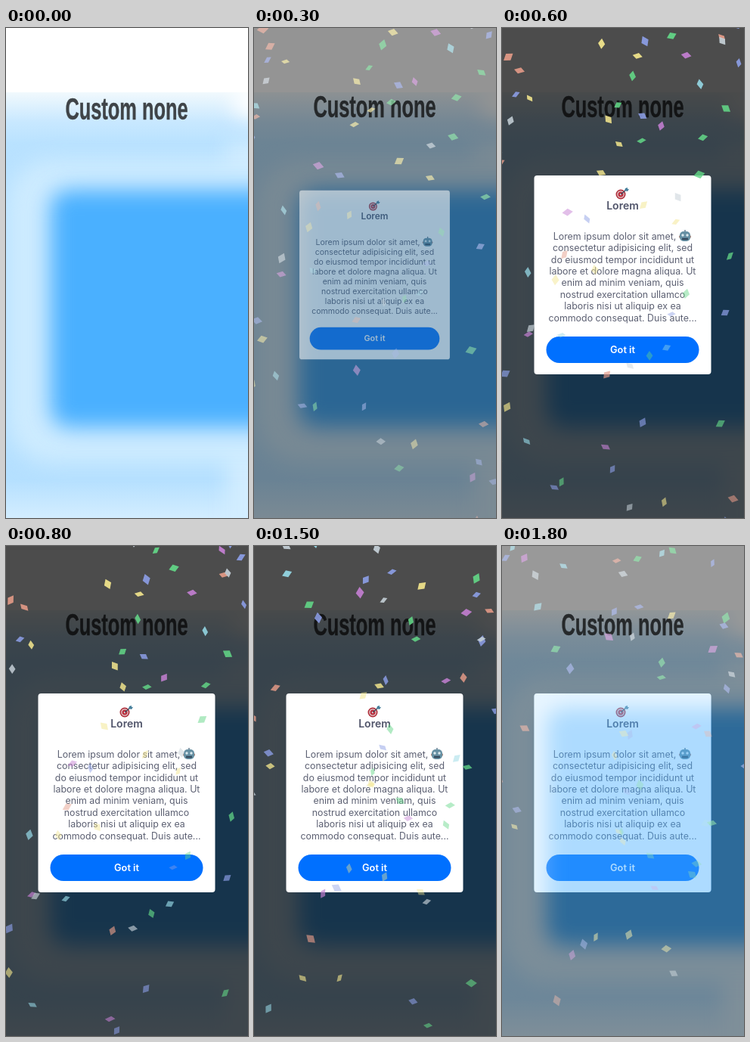
Write an HTML page with a canvas that moves like this. It is 320 px wide and 648 px high and loops after 1.9 s.

```html
<!DOCTYPE html>
<html lang="en">
<head>
<meta charset="utf-8">
<title>Confetti popup</title>
<style>
  html, body { margin: 0; width: 100%; height: 100%; overflow: hidden; background: #fff; }
  svg, canvas { position: absolute; left: 0; top: 0; width: 320px; height: 648px; }
  svg { overflow: hidden; }
  text { text-anchor: middle; font-family: Inter, sans-serif; }
  .soft { filter: blur(14px); }
  .heading { font: bold 25.4px "Liberation Sans", Arial, sans-serif; fill: #3f4448; stroke: #3f4448; stroke-width: .3px; }
  .name { font-size: 14px; font-weight: 600; fill: #50546a; }
  .body { font-size: 12.4px; fill: #5d6173; }
  .action { font-size: 12.8px; font-weight: 600; fill: #fff; }
</style>
</head>
<body>
<svg viewBox="0 0 320 648">
  <defs>
    <linearGradient id="sky" x2="0" y2="1">
      <stop offset="0" stop-color="#f1f9fd"/>
      <stop offset=".07" stop-color="#c8e8ff"/>
      <stop offset=".12" stop-color="#b9e2ff"/>
      <stop offset=".91" stop-color="#b5e0ff"/>
      <stop offset="1" stop-color="#d3edff"/>
    </linearGradient>
  </defs>
  <rect width="320" height="648" fill="#fff"/>
  <rect y="85" width="320" height="563" fill="url(#sky)"/>
  <ellipse class="soft" cx="328" cy="98" rx="30" ry="22" fill="#fff"/>
  <rect class="soft" x="292" y="150" width="80" height="560" fill="#d2edff"/>
  <rect class="soft" x="2" y="174" width="400" height="402" rx="60" fill="#cdebff"/>
  <rect class="soft" x="59" y="214" width="400" height="314" rx="24" fill="#4ab0ff"/>
  <g id="heading">
    <text class="heading" transform="translate(159.5 121.3) scale(1 1.6)">Custom none</text>
  </g>

  <path id="shade" d="M-900-900H1300V1600H-900z
    M46.500 195h226a4 4 0 0 1 4 4v255a4 4 0 0 1-4 4h-226a4 4 0 0 1-4-4v-255a4 4 0 0 1 4-4z"/>

  <g id="card">
    <rect x="42.5" y="195" width="234" height="263" rx="4" fill="#fff"/>
    <g id="dartboard">
      <circle cx="157" cy="220" r="6.500" fill="#b0303c"/>
      <circle cx="157" cy="220" r="4.800" fill="#e5d3d4"/>
      <circle cx="157" cy="220" r="3.500" fill="#b92f3e"/>
      <circle cx="157" cy="220" r="1.200" fill="#f3e4e4"/>
      <path d="M157 220l6-5" stroke="#3c4a5c" stroke-width="1.300"/>
      <path d="M162 215l1-3 3-1v2h2l-2 3z" fill="#47809c"/>
    </g>
    <text class="name" x="159.5" y="240">Lorem</text>
    <g id="lines"></g>
    <g id="robot">
      <path d="M242 267v3" stroke="#60798c" stroke-width="1.500"/>
      <rect x="234" y="274" width="16" height="4" rx="2" fill="#a9796a"/>
      <rect x="235" y="269" width="14" height="13" rx="5" fill="#6690a3"/>
      <circle cx="239" cy="274" r="1.700" fill="#dbe9ee"/>
      <circle cx="245" cy="274" r="1.700" fill="#dbe9ee"/>
      <path d="M238 279h8" stroke="#34495c" stroke-width="2.500"/>
    </g>
    <rect x="58.5" y="408" width="202" height="35" rx="17.5" fill="#0070ff"/>
    <text class="action" x="159.5" y="430">Got it</text>
  </g>
</svg>
<canvas id="confetti" width="320" height="648"></canvas>
<script>
const $ = id => document.getElementById(id);
const ctx = $('confetti').getContext('2d');
const LOOP = 1900, STEP = 100, CLOSING = 1600;
const CENTER = { x: 159.5, y: 326.5 }, CARD = { w: 234, h: 263 };

const copy = [
  'Lorem ipsum dolor sit amet,',
  'consectetur adipisicing elit, sed',
  'do eiusmod tempor incididunt ut',
  'labore et dolore magna aliqua. Ut',
  'enim ad minim veniam, quis',
  'nostrud exercitation ullamco',
  'laboris nisi ut aliquip ex ea',
  'commodo consequat. Duis aute...'
];
$('lines').innerHTML = copy.map((line, i) =>
  `<text class="body" x="${i ? 159.5 : 149}" y="${279.8 + i * 15.4}">${line}</text>`).join('');

// [time, value] keys
const shadeKeys = [[0, 0], [100, .02], [200, .1], [300, .42], [400, .65], [500, .7], [1600, .7], [1700, .6], [1800, .4]];
const fadeKeys = [[100, 0], [200, .05], [300, .55], [400, .9], [500, 1], [1600, 1], [1700, .85], [1800, .55]];
const scaleKeys = [[100, .45], [200, .57], [300, .85], [400, .967], [500, 1]];
const headingKeys = [[0, 0], [200, -3.3]];

function valueAt(keys, t) {
  const next = keys.findIndex(key => key[0] >= t);
  if (next < 0) return keys[keys.length - 1][1];
  if (next === 0) return keys[0][1];
  const [t0, a] = keys[next - 1], [t1, b] = keys[next];
  return a + (b - a) * (t - t0) / (t1 - t0);
}

let seed = 20;
const random = (min, max) => {
  seed = (seed * 16807) % 2147483647;
  return min + (max - min) * seed / 2147483647;
};

// Hue, saturation, lightness: green, blue, yellow, salmon, cyan, purple, grey
const palette = [[139, 58, 61], [228, 62, 72], [52, 80, 75], [12, 62, 71], [190, 60, 74],
  [139, 58, 61], [228, 62, 72], [52, 80, 75], [290, 48, 66], [205, 18, 80]];
const COUNT = 68;
const pieces = Array.from({ length: COUNT }, (_, i) => ({
  color: palette[i % palette.length],
  x: random(-5, 325),
  phase: (i * .618 + random(0, .05)) % 1,
  speed: random(.25, .38),
  drift: random(-18, 18),
  angle: random(0, 6.28),
  spin: random(-3, 3),
  tumble: random(2, 5),
  size: random(7.5, 9.5)
}));

function drawConfetti(t, visible, scale) {
  ctx.clearRect(0, 0, 320, 648);
  const sec = t / 1000;
  for (const p of pieces) {
    const x = p.x + p.drift * sec;
    const y = 670 * ((p.phase + p.speed * sec) % 1) ** 1.5 - 8;
    const overCard = Math.abs(x - CENTER.x) < CARD.w / 2 * scale && Math.abs(y - CENTER.y) < CARD.h / 2 * scale;
    const [h, s, l] = p.color;
    const angle = p.angle + p.spin * sec;
    const flip = .78 + .2 * Math.sin(p.phase * 40 + p.tumble * sec);
    const c = Math.cos(angle), n = Math.sin(angle);
    ctx.save();
    ctx.globalAlpha = Math.min(1, visible * 6) * (.5 + .45 * visible) * (1 - y / 1600) * (overCard ? .62 : 1);
    ctx.fillStyle = `hsl(${h} ${s}% ${l + (1 - visible) * (96 - l) * .85}%)`;
    ctx.translate(x, y);
    ctx.transform(c, n, -n * flip + .35 * c, c * flip + .35 * n, 0, 0);
    ctx.fillRect(-p.size / 2, -p.size / 2, p.size, p.size);
    ctx.restore();
  }
}

function render(now) {
  const t = Math.floor(now % LOOP / STEP) * STEP;
  const shade = valueAt(shadeKeys, t);
  const scale = valueAt(scaleKeys, t);
  const place = `translate(${CENTER.x} ${CENTER.y}) scale(${scale}) translate(${-CENTER.x} ${-CENTER.y})`;
  $('heading').setAttribute('transform', `translate(0 ${valueAt(headingKeys, t)})`);
  $('shade').setAttribute('transform', place);
  $('shade').setAttribute('opacity', shade);
  // While closing, the shade leaves the card's area open
  $('shade').setAttribute('fill-rule', t < CLOSING ? 'nonzero' : 'evenodd');
  $('card').setAttribute('transform', place);
  $('card').setAttribute('opacity', valueAt(fadeKeys, t));
  drawConfetti(t, shade / .7, scale);
}

function tick() {
  render(performance.now());
  requestAnimationFrame(tick);
}
tick();
</script>
</body>
</html>
```
